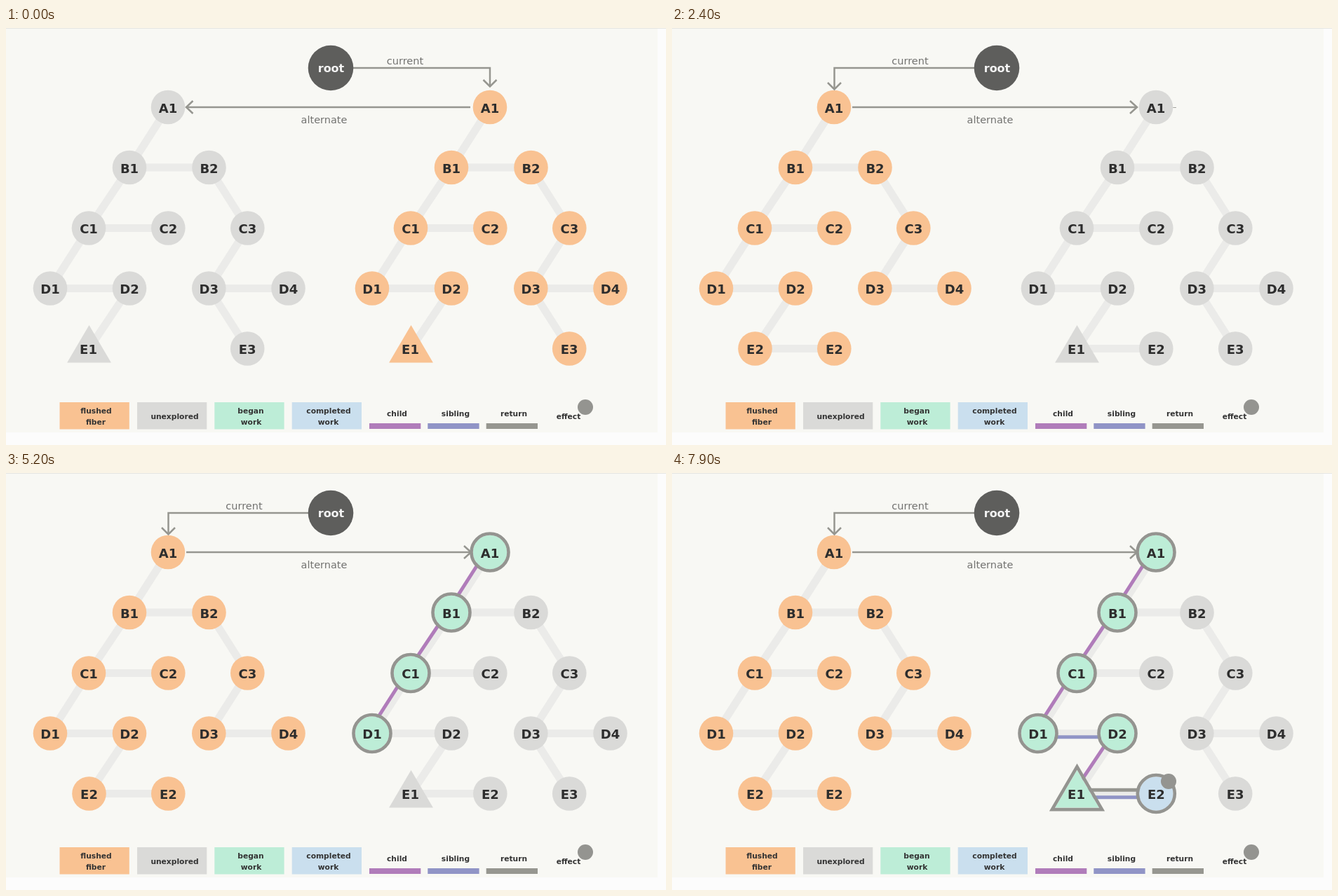
Animation, 941 px wide and 595 px high, one loop 8 s. Source, as an HTML page:

```html
<!DOCTYPE html>
<html lang="en">
<head>
<meta charset="utf-8">
<title>Tree traversal</title>
<style>
  html, body { margin: 0; width: 100%; height: 100%; overflow: hidden; background: #fcfcfc; }
  svg { display: block; width: 941px; height: 595px; }
  text { font-family: "DejaVu Sans", Verdana, sans-serif; text-anchor: middle; }
  .label { font-weight: bold; font-size: 18px; fill: #2d2d2d; }
  .key { font-weight: bold; font-size: 10.7px; fill: #333; }
  .note { font-size: 14.5px; fill: #727270; }
  .arrow { fill: none; stroke: #969690; stroke-width: 2.5; }
  .ring { fill: none; stroke: #949490; stroke-width: 4.6; stroke-miterlimit: 10; }
  .edge { stroke: #ebebe9; stroke-width: 11; }
  .link { stroke-width: 5; }
</style>
</head>
<body>
<svg id="stage" viewBox="0 0 941 595"></svg>
<script>
const LOOP = 8000;
const SWAP = 800, STEP = 400;
const SHIFT = 459;
const COLORS = {
  flushed: [249, 194, 146],
  idle: [218, 218, 216],
  began: [189, 237, 215],
  done: [202, 223, 238],
  child: [176, 124, 186],
  sibling: [144, 148, 198],
  back: [150, 150, 144]
};
const SPOTS = {
  A1: [231, 113], B1: [176, 199], B2: [289.5, 199],
  C1: [118, 285.5], C2: [231.3, 285.5], C3: [344.3, 285.5],
  D1: [63, 371.5], D2: [176, 371.5], D3: [289.3, 371.5], D4: [402.5, 371.5],
  E1: [118.5, 457.5], E2: [231.3, 457.5], E3: [344.2, 457.5]
};
const EDGES = 'A1-B1 B1-B2 B1-C1 C1-C2 B2-C3 C1-D1 D1-D2 C3-D3 D3-D4 D2-E1 E1-E2 D3-E3'
  .split(' ').map(e => e.split('-'));
// node and the moment its outline starts
const VISITS = { A1: 2400, B1: 3200, C1: 4000, D1: 4800, D2: 5600, E1: 6400, E2: 7200 };
// from, to, kind, start, duration
const LINKS = [
  ['A1', 'B1', 'child', 2800, 400],
  ['B1', 'C1', 'child', 3600, 400],
  ['C1', 'D1', 'child', 4400, 400],
  ['D1', 'D2', 'sibling', 5200, 400],
  ['D2', 'E1', 'child', 6000, 400],
  ['E1', 'E2', 'sibling', 6800, 400],
  ['E2', 'E1', 'back', 7600, 300]
];
const COMPLETE = 7600;
const disc = r => `M${r} 0A${r} ${r} 0 1 1 ${-r} 0A${r} ${r} 0 1 1 ${r} 0Z`;
const triangle = (half, top, base) => `M0 ${base}L${-half} ${base}L0 ${top}L${half} ${base}Z`;
const DISC = disc(24.3), DISC_RING = disc(26.5);
const TRI = triangle(31.4, -33.5, 20), TRI_RING = triangle(35.6, -38.5, 22.6);

const stage = document.getElementById('stage');
const updates = [];

function add(tag, attrs, parent = stage) {
  const el = document.createElementNS('http://www.w3.org/2000/svg', tag);
  for (const name in attrs) el.setAttribute(name, attrs[name]);
  return parent.appendChild(el);
}
function write(str, x, y, cls, parent) {
  const el = add('text', { x, y, class: cls }, parent);
  el.textContent = str;
  return el;
}
const rect = (x, y, width, height, fill) => add('rect', { x, y, width, height, fill });
const rgb = c => `rgb(${c.map(Math.round).join()})`;
const mix = (a, b, p) => a.map((v, i) => v + (b[i] - v) * p);
const ramp = (t, start, len) => Math.min(1, Math.max(0, (t - start) / len));
const smooth = p => p * p * (3 - 2 * p);
const swapAt = t => smooth(ramp(t, SWAP, STEP));

// mode: 'in' appears with the swap, 'out' leaves with it
function fade(el, mode) {
  if (mode) updates.push(t => {
    const p = swapAt(t);
    el.setAttribute('opacity', mode === 'in' ? p : 1 - p);
  });
  return el;
}

function drawBackdrop() {
  rect(0, 0, 941, 595, '#fcfcfc');
  rect(0, 0, 929, 577, '#f8f8f4');
  rect(0, 0, 941, 1, '#e6e6e2');
}

function drawEdges(dx) {
  for (const [a, b] of EDGES) {
    const [x1, y1] = SPOTS[a], [x2, y2] = SPOTS[b];
    const el = add('line', { x1: x1 + dx, y1, x2: x2 + dx, y2, class: 'edge' });
    fade(el, b === 'E2' ? 'in' : !dx && b === 'E3' ? 'out' : '');
  }
}

function drawPointers(mode, paths, noteX) {
  const g = fade(add('g', {}), mode);
  for (const d of paths) add('path', { d, class: 'arrow' }, g);
  write('current', noteX, 52, 'note', g);
}

function drawLink([a, b, kind, start, len]) {
  const [ax, ay] = SPOTS[a], [bx, by] = SPOTS[b];
  const size = Math.hypot(bx - ax, by - ay);
  const ux = (bx - ax) / size, uy = (by - ay) / size;
  const trim = 12, side = 5.3;
  const x1 = ax + SHIFT + ux * trim - uy * side;
  const y1 = ay + uy * trim + ux * side;
  const el = add('line', { x1, y1, class: 'link', stroke: rgb(COLORS[kind]) });
  updates.push(t => {
    const run = (size - 2 * trim) * ramp(t, start, len);
    el.setAttribute('x2', x1 + ux * run);
    el.setAttribute('y2', y1 + uy * run);
    el.setAttribute('visibility', run ? 'visible' : 'hidden');
  });
}

function drawNode(name, dx, { tri = false, mode = '', before, after, visit }) {
  const [x, y] = SPOTS[name];
  const g = fade(add('g', { transform: `translate(${x + dx} ${y})` }), mode);
  const body = add('path', { d: tri ? TRI : DISC }, g);
  const ring = visit && add('path', { d: tri ? TRI_RING : DISC_RING, class: 'ring', pathLength: 1 }, g);
  write(name === 'E1' && !tri ? 'E2' : name, tri ? -1 : 0, 7.5, 'label', g);
  updates.push(t => {
    let color = mix(COLORS[before], COLORS[after], swapAt(t));
    if (visit) {
      color = mix(color, COLORS.began, ramp(t, visit, 200));
      if (name === 'E2') color = mix(color, COLORS.done, ramp(t, COMPLETE, 200));
      const p = Math.max(0.006, ramp(t, visit, STEP));
      ring.setAttribute('stroke-dasharray', p < 1 ? `${p} 2` : 'none');
      ring.setAttribute('visibility', t >= visit ? 'visible' : 'hidden');
    }
    body.setAttribute('fill', rgb(color));
  });
}

function drawTrees() {
  const left = { before: 'idle', after: 'flushed' };
  for (const name in SPOTS) {
    if (name === 'E1') {
      drawNode(name, 0, { before: 'idle', after: 'idle', tri: true, mode: 'out' });
      drawNode(name, 0, { before: 'flushed', after: 'flushed', mode: 'in' });
    } else {
      drawNode(name, 0, { ...left, mode: { E2: 'in', E3: 'out' }[name] });
    }
    drawNode(name, SHIFT, {
      tri: name === 'E1',
      mode: name === 'E2' ? 'in' : '',
      before: name === 'E2' ? 'idle' : 'flushed',
      after: 'idle',
      visit: VISITS[name]
    });
  }
}

function drawLegend() {
  [['flushed', 76.5], ['idle', 187], ['began', 297.3], ['done', 407.7]]
    .forEach(([kind, x]) => rect(x, 534, 99.3, 38.5, rgb(COLORS[kind])));
  [['child', 518], ['sibling', 601.3], ['back', 684.7]]
    .forEach(([kind, x]) => rect(x, 564, 73.3, 8, rgb(COLORS[kind])));
  [
    ['flushed', 128.5, 550], ['fiber', 128, 565.5], ['unexplored', 240.5, 557.5],
    ['began', 349, 550], ['work', 349.5, 565.5],
    ['completed', 460, 550], ['work', 459.5, 565.5],
    ['child', 557.5, 554], ['sibling', 641, 554], ['return', 724, 554],
    ['effect', 802, 557.5]
  ].forEach(([str, x, y]) => write(str, x, y, 'key'));
  add('circle', { cx: 826, cy: 541, r: 11, fill: '#949490' });
}

drawBackdrop();
drawEdges(0);
drawEdges(SHIFT);
LINKS.forEach(drawLink);
drawTrees();
drawPointers('out', [
  'M495 57H690V83', 'M680.5 74L690 83.5L699.5 74',
  'M662 113H257', 'M266.5 104L257 113L266.5 122'
], 569);
drawPointers('in', [
  'M431 57H231.5V87', 'M222 78L231.5 87.5L241 78',
  'M257 113H663', 'M653 104L663 113L653 122'
], 339.5);
write('alternate', 453.5, 136, 'note');
add('circle', { cx: 463, cy: 57, r: 32.3, fill: '#5e5e5c' });
write('root', 463.5, 63, 'label').setAttribute('style', 'font-size:16px;fill:#f4f4f4');
drawLegend();

const badge = add('circle', { cx: 708, cy: 440, fill: '#949490' });
updates.push(t => badge.setAttribute('r', 11 * smooth(ramp(t, COMPLETE, 200))));

const origin = performance.now();
function render() {
  const t = Math.max(0, performance.now() - origin) % LOOP;
  for (const update of updates) update(t);
  requestAnimationFrame(render);
}
render();
</script>
</body>
</html>
```
